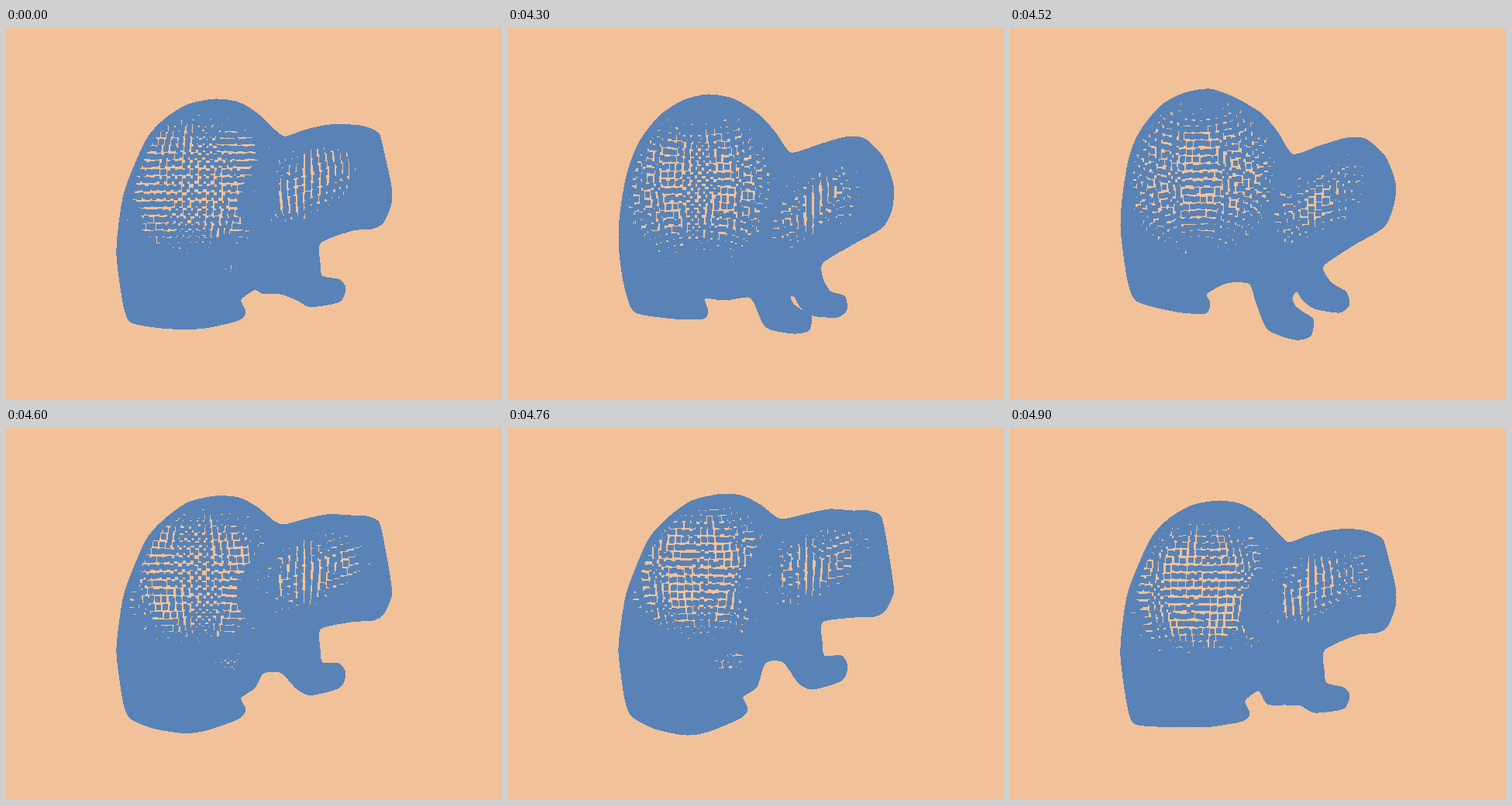
An HTML page for the animation above (5 s loop, 640 by 480 pixels).

```html
<!DOCTYPE html>
<html lang="en">
<head>
<meta charset="utf-8">
<title>Turning animal</title>
<style>
html, body { margin: 0; width: 100%; height: 100%; overflow: hidden; background: #f1c19a; }
svg { display: block; width: 100vw; height: 100vh; }
.sand { fill: #f1c19a; }
.blue { fill: #5983b6; stroke: #5983b6; stroke-width: 1; }
#tiles { stroke: none; }
#rim { fill: none; stroke-width: 17; }
</style>
</head>
<body>
<svg viewBox="0 0 640 480" shape-rendering="crispEdges">
  <clipPath id="inside"><path id="edge"/></clipPath>
  <rect class="sand" width="640" height="480"/>
  <path id="body" class="blue"/>
  <g clip-path="url(#inside)">
    <path id="windows" class="sand"/>
    <path id="tiles" class="blue"/>
    <path id="rim" class="blue"/>
  </g>
</svg>
<script>
const LOOP = 5000;

// Key points, clockwise: x, then y at either end of the turn
const parse = text => text.trim().split(/\s+/).map(p => p.split(',').map(Number));
const raised = parse(`143,295,290 146,250,255 154,207,210 180,146,146 204,118,118 235,100,95
  270,94,86 300,99,87 325,115,99 347,137,116 360,148,117 385,139,111 415,132,105 445,131,107
  465,135,107 481,144,114 488,168,145 497,205,203 497,230,214 487,256,235 473,264,243 447,267,244
  406,286,250 405,312,275 408,329,294 430,335,294 438,345,308 430,362,326 393,367,337 375,358,329
  355,357,302 332,356,303 321,339,334 303,352,347 309,368,362 300,378,374 260,385,391 230,386,396
  190,385,388 160,381,372 151,355,350`);
const bowed = parse(`143,270,255 146,230,213 155,183,163 170,146,130 195,114,100 225,94,84
  258,86,79 292,92,91 325,113,111 345,135,134 365,161,163 400,151,152 435,141,142 460,143,144
  484,167,166 497,203,200 495,235,228 482,258,257 445,279,279 406,303,305 406,323,317 416,340,330
  434,346,341 437,363,358 425,373,367 393,371,362 378,361,351 370,347,340 364,346,348 368,356,359
  377,363,366 391,372,376 388,390,397 368,394,402 333,386,389 318,355,355 309,347,330 280,351,329
  254,349,343 258,365,355 252,375,368 215,375,366 165,367,353 153,343,330 146,308,287`);

const mix = (a, b, k) => a + (b - a) * k;

// Closed smooth curve through the key points at turn k
function outline(keys, k) {
  const p = keys.map(([x, a, b]) => [x, mix(a, b, k)]);
  const n = p.length, at = i => p[(i + n) % n];
  const lean = (i, s) => [0, 1].map(c => at(i)[c] + s * (at(i + 1)[c] - at(i - 1)[c]) / 8);
  return 'M' + p[0] + p.map((_, i) => `C${lean(i, 1)},${lean(i + 1, -1)},${at(i + 1)}`).join('') + 'Z';
}

function random(seed) {
  return () => {
    seed = (seed + 0x6D2B79F5) | 0;
    let t = Math.imul(seed ^ seed >>> 15, 1 | seed);
    t ^= t + Math.imul(t ^ t >>> 7, 61 | t);
    return ((t ^ t >>> 14) >>> 0) / 4294967296;
  };
}

// A point of a rounded hull, turned about the horizontal axis
function place(hull, a, b, turn) {
  const dx = hull.rx * Math.sin(a) * Math.cos(b);
  const rise = Math.sin(b) * Math.cos(turn) + Math.cos(a) * Math.cos(b) * Math.sin(turn);
  return [hull.x + dx, hull.y + hull.ry * rise + (hull.slope || 0) * dx];
}

function windowPath(hull) {
  let d = '';
  for (let b = 0; b < 2 * Math.PI; b += 0.1) {
    d += (d ? 'L' : 'M') + place(hull, Math.PI / 2, b, 0).map(v => v.toFixed(1));
  }
  return d + 'Z';
}

// Square tiles over the front and the back of a hull
function tilePath(hull, turn) {
  const rnd = random(71), step = hull.pitch, size = hull.tile;
  const rows = Math.round(Math.PI * hull.ry / step);
  const cols = Math.round(2 * Math.PI * hull.rx / step);
  let d = '';
  for (let r = 0; r < rows; r++) {
    const b = ((r + 0.5) / rows - 0.5) * Math.PI;
    for (let c = 0; c < cols; c++) {
      const [x, y] = place(hull, (c + 0.3) / cols * 2 * Math.PI, b, turn);
      const w = Math.round(size + rnd() - 0.5), h = Math.round(size + 0.5 + rnd());
      const left = Math.round(x - w / 2 + rnd() * 2 - 1);
      const top = Math.round(y - h / 2 + rnd() * 2 - 1);
      d += `M${left} ${top}h${w}v${h}h${-w}z`;
    }
  }
  return d;
}

function raisedHulls(k) {
  const y = mix(0, -22, k);
  return [
    { x: 248, y: 207 + y, rx: 101, ry: 110, pitch: 10.5, tile: 6 },
    { x: 387, y: 208 + y * 1.3, rx: 86, ry: 63, slope: -0.33, pitch: 10.5, tile: 7 },
    { x: 285, y: 297, rx: 8 + 20 * k, ry: 28, pitch: 9, tile: 6 }
  ];
}

function bowedHulls(k) {
  return [
    { x: 245, y: mix(205, 190, k), rx: 103, ry: 112, pitch: 10.5, tile: 6 },
    { x: 396, y: 228 - 3 * k, rx: 66, ry: 63, slope: -0.5, pitch: 10.5, tile: 7 }
  ];
}

function pose(keys, hulls, k, turn) {
  const parts = hulls(k);
  return {
    line: outline(keys, k),
    windows: parts.map(windowPath).join(''),
    tiles: parts.map(h => tilePath(h, turn)).join('')
  };
}
const raise = k => pose(raised, raisedHulls, k, mix(0.15, -0.2, k));
const bow = k => pose(bowed, bowedHulls, k, mix(0.3, 0.42, k));

// End time of each step and its pose
const steps = [
  [4300, raise(0.25)],
  [4400, bow(0)],
  [4600, bow(1)],
  [4700, raise(0.75)],
  [4800, raise(1)],
  [4900, raise(0.88)],
  [LOOP, raise(0)]
];

const set = (id, d) => document.getElementById(id).setAttribute('d', d);
let shown;

function draw(time) {
  const next = steps.find(([end]) => time % LOOP < end)[1];
  if (next === shown) return;
  shown = next;
  for (const id of ['body', 'edge', 'rim']) set(id, next.line);
  set('windows', next.windows);
  set('tiles', next.tiles);
}

function tick() {
  draw(performance.now());
  requestAnimationFrame(tick);
}
tick();
</script>
</body>
</html>
```
